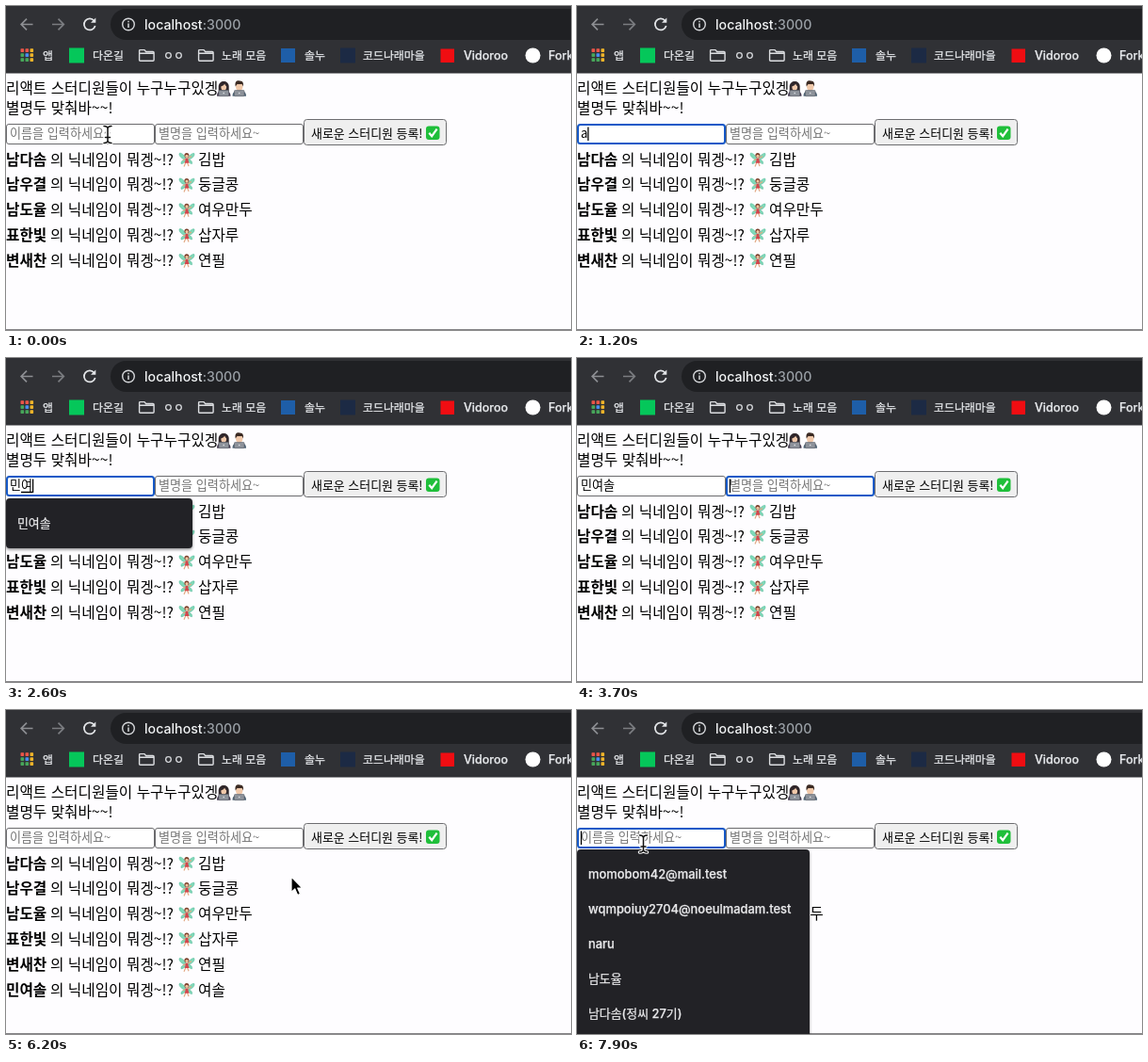
Write an HTML page that moves like this. It is 600x344 px and loops after 8 s.

```html
<!DOCTYPE html>
<html lang="ko">
<head>
<meta charset="utf-8">
<title>스터디원 목록</title>
<style>
html, body { margin: 0; width: 100%; height: 100%; overflow: hidden; background: #fefdff; }
svg { display: block; width: 100vw; height: 100vh; }
text { font-family: "Noto Sans CJK KR", "Noto Sans CJK", "Noto Sans CJK JP", sans-serif; white-space: pre; }
.ui { font-family: Inter, "Noto Sans CJK KR", "Noto Sans CJK", "Noto Sans CJK JP", sans-serif; font-weight: 500; }
.mark { font-size: 11.9px; fill: #e8eaed; stroke: #e8eaed; stroke-width: .25px; }
.page { font-size: 15.7px; fill: #000; }
.field { font-size: 13.1px; }
.menu { font-size: 12.9px; fill: #e9e9eb; stroke: #e9e9eb; stroke-width: .25px; }
</style>
</head>
<body>
<svg viewBox="0 0 600 344" preserveAspectRatio="none">
  <defs>
    <g id="fairy">
      <path d="M8 8.500C6 4 2 1 .5 2.500 0 5 3 8 6.500 9 3.500 9.500 2 11.500 2.500 13.500c3 0 4.500-2.500 5.500-5zM9 8.500c2-4.500 6-7 7.500-6 .5 3-2.500 5.500-6 6.500 3 .5 4 2.500 3.500 4.500-2.500 0-4-2.500-5-5z" fill="#7fd9b8" stroke="#4fb596" stroke-width=".5"/>
      <path d="M7.500 12l-2 4.500M9 12l1.500 4M7.500 8l-3 2M9.500 8l4-2.500" stroke="#e2a883" stroke-width="1.200" fill="none"/>
      <path d="M7.200 7.500h2.500l.4 2.500 1 2.700H6l1-2.700z" fill="#d2464c"/>
      <circle cx="8.400" cy="4.500" r="2.500" fill="#7a3f2a"/>
      <circle cx="8.500" cy="5.200" r="1.600" fill="#f2c6a2"/>
    </g>
    <g id="laptop">
      <rect x="3" y="10.500" width="10.500" height="6.200" rx=".8" fill="#8d929a" stroke="#5f646c" stroke-width=".6"/>
      <circle cx="8.200" cy="13.500" r=".8" fill="#e3e5e8"/>
    </g>
    <g id="woman">
      <path d="M2.700 13V6.500c0-7.500 11-7.500 11 0V13z" fill="#30272b"/>
      <path d="M1 16.700c0-5 3-6 7.200-6s7.300 1 7.300 6z" fill="#453a50"/>
      <ellipse cx="8.200" cy="7" rx="2.900" ry="3.600" fill="#f0c8aa"/>
      <path d="M4.700 6.500c2-.5 4-1.500 4.500-3 .4 1.500 1.500 2.500 2.700 3V3L8 1 5 3z" fill="#30272b"/>
      <use href="#laptop"/>
    </g>
    <g id="man">
      <path d="M1 16.700c0-5 3-6 7.200-6s7.300 1 7.300 6z" fill="#4d6274"/>
      <ellipse cx="8.200" cy="6.500" rx="3.700" ry="4.400" fill="#f0c8aa"/>
      <path d="M4.200 6.500C3 0 7 0 8.500.5c4-.3 4.500 3 3.700 6l-1-2.500H6z" fill="#3b2a23"/>
      <use href="#laptop"/>
    </g>
    <path id="folder" d="M.6 2.500V1.600Q.6.6 1.600.6H6l1.600 1.900h7.500q1 0 1 1v7.800q0 1-1 1H1.600q-1 0-1-1zM.6 4.300h15.500" fill="none" stroke="#dcdee1" stroke-width="1.400"/>
    <path id="bar" d="M-4-9Q0-9 0-6V6Q0 9-4 9M4-9Q0-9 0-6M4 9Q0 9 0 6M-2.500 3H2.500"/>
    <filter id="shade" x="-10%" y="-10%" width="120%" height="130%">
      <feDropShadow dx="0" dy="1.500" stdDeviation="1.800" flood-opacity=".45"/>
    </filter>
  </defs>

  <rect width="600" height="344" fill="#fefdff"/>
  <g id="page"></g>
  <g id="form"></g>
  <rect y="343" width="600" height="1" fill="#858487"/>
  <g id="menus"></g>
  <g id="chrome"></g>

  <g id="beam" fill="none" stroke-linecap="round">
    <use href="#bar" stroke="#fff" stroke-width="3.600"/>
    <use href="#bar" stroke="#111" stroke-width="1.500"/>
  </g>
  <path id="arrow" d="M0 0V16.500L3.800 13 6.600 19.500 9.500 18.300 6.700 12H11.700Z" fill="#000" stroke="#fff" stroke-width="1.200" stroke-linejoin="round"/>
</svg>
<script>
const LOOP = 8000;
const NEW_NAME = '민여솔', NEW_NICK = '여솔';
const $ = id => document.getElementById(id);
const label = (x, y, s, cls, more = '') => `<text x="${x}" y="${y}" class="${cls}" ${more}>${s}</text>`;
const box = (x, y, w, h, r, fill, more = '') =>
  `<rect x="${x}" y="${y}" width="${w}" height="${h}" rx="${r}" fill="${fill}" ${more}/>`;
const put = (id, x, y) => `<use href="#${id}" x="${x}" y="${y}"/>`;
const show = (el, on) => el.setAttribute('visibility', on ? 'visible' : 'hidden');
const setAll = (el, attrs) => Object.entries(attrs).forEach(([k, v]) => el.setAttribute(k, v));

// Browser toolbar and bookmarks
function toolbar() {
  const dots = ['#ea5548', '#ea5548', '#f0b429', '#47a65a', '#4a8df0', '#f0b429', '#47a65a', '#47a65a', '#f0b429'];
  return box(0, 0, 600, 71.5, 0, '#303135') + box(111, 3, 520, 33, 16.5, '#1f2023') +
    `<g fill="none" stroke-width="1.700">
      <path d="M28.500 19.500H16.500M22 13.700l-5.800 5.800 5.800 5.800" stroke="#8d8f93"/>
      <path d="M49 19.500H61M55.500 13.700l5.800 5.800-5.800 5.800" stroke="#7b7d81"/>
      <path d="M93.600 15.700A6 6 0 1 0 94.700 21" stroke="#e3e5e8"/>
      <circle cx="130" cy="19.500" r="6.300" stroke="#d5d7da" stroke-width="1.400"/>
      <path d="M130 18.600V23M130 15.700V17.200" stroke="#d5d7da" stroke-width="1.500"/>
    </g><path d="M95.300 12.500v5.300h-5.300z" fill="#e3e5e8"/>` +
    label(147, 24.7, 'localhost<tspan fill="#9aa0a6">:3000</tspan>', 'ui', 'font-size="14.200" fill="#f1f3f4"') +
    dots.map((c, i) => box(15.5 + i % 3 * 5, 45.3 + (i / 3 | 0) * 5, 3.6, 3.6, .6, c)).join('') +
    box(67, 44.5, 16, 16, 0, '#05c75a') + put('folder', 141, 46) + put('folder', 204, 46) +
    box(292, 45, 15, 15, 0, '#1e5ea8') + box(355, 44.5, 16, 16, 0, '#1c2a44') +
    box(461.5, 45.5, 14.5, 14.5, 0, '#f00d12') + '<circle cx="559.500" cy="52.500" r="8" fill="#fff"/>' +
    [[39, '앱'], [92, '다온길'], [167, 'ㅇㅇ'], [229, '노래 모음'], [317, '솔누'], [379, '코드나래마을']]
      .map(([x, s]) => label(x, 56.7, s, 'mark')).join('') +
    [[486, 'Vidoroo'], [576, 'Forkubo']]
      .map(([x, s]) => label(x, 56.7, s, 'mark ui', 'style="font-size:12.500px"')).join('');
}

function member([name, nick], i) {
  const y = 168.6 + i * 26.8;
  return `<g id="row${i}">` + label(0, y, name, 'page', 'font-weight="700"') +
    label(47, y, '의 닉네임이 뭐겡~!?', 'page') + put('fairy', 183.5, y - 14.5) + label(204, y, nick, 'page') + '</g>';
}

function menu(id, y, w, h, pitch, items) {
  return `<g id="${id}">` + box(0, y, w, h, 4, '#242427', 'filter="url(#shade)"') +
    items.map((s, i) => label(12, y + 31 + i * pitch, s, 'menu ui')).join('') + '</g>';
}

$('chrome').innerHTML = toolbar();
$('page').innerHTML =
  label(0, 92.5, '리액트 스터디원들이 누구누구있겡', 'page') + put('woman', 223, 79) + put('man', 239.5, 79) +
  label(0, 114, '별명두 맞춰바~~!', 'page') +
  [['남다솜', '김밥'], ['남우결', '둥글콩'], ['남도율', '여우만두'], ['표한빛', '삽자루'], ['변새찬', '연필'], [NEW_NAME, NEW_NICK]]
    .map(member).join('');
$('form').innerHTML = [0, 158].map((x, i) =>
  `<g id="field${i}">` + box(x, 125, 157, 21, 2.5, '#fff') + label(x + 4, 139.8, '', 'field') +
  '<path fill="none" stroke="#000" stroke-width="1.300"/></g>').join('') +
  box(316.5, 120.5, 151, 27, 3, '#efefef', 'id="button" stroke="#6d6d70"') +
  label(324, 139.5, '새로운 스터디원 등록!', '', 'font-size="12.950"') +
  box(446, 127.5, 14.5, 14.5, 3, '#1fbf3a') +
  '<path d="M449.300 134.800l2.900 3.400 5.400-7.500" fill="none" stroke="#fff" stroke-width="2.200"/>';
$('menus').innerHTML = menu('hint', 149, 198, 53, 37, [NEW_NAME]) +
  menu('history', 148, 247, 210, 37.1,
    ['momobom42@mail.test', 'wqmpoiuy2704@noeulmadam.test', 'naru', '남도율', '남다솜(정씨 27기)']);

// Typing: [time, value]
const typed = [
  [[0, ''], [1100, 'a'], [1500, ''], [1800, 'ㅁ'], [2000, '미'], [2200, '민'], [2400, '민ㅇ'], [2550, '민여'],
   [2750, '민엿'], [2900, '민여소'], [3050, NEW_NAME], [5700, '']],
  [[0, ''], [3900, 'ㅇ'], [4000, '여'], [4100, '엿'], [4200, '여소'], [4280, NEW_NICK], [5700, '']]
];
const focus = [[0, -1], [500, 0], [3500, 1], [5600, -1], [7700, 0]];
const menus = [[0, ''], [500, 'history'], [1100, ''], [1500, 'history'], [1800, ''], [2200, 'hint'], [3300, ''], [7700, 'history']];
const route = [[0, 108, 136.5], [4700, 181.5, 74], [4800, 181.5, 74], [5400, 385, 136], [5700, 385, 136],
  [6200, 303, 177], [7300, 303, 177], [7700, 70.5, 142], [LOOP, 70.5, 142]];
const hints = ['이름을 입력하세요~', '별명을 입력하세요~'];
const last = (keys, t) => keys.filter(k => k[0] <= t).pop();

function drawField(i, t) {
  const [rect, text, line] = $('field' + i).children;
  const [since, value] = last(typed[i], t);
  const [focused, which] = last(focus, t);
  const active = which === i, left = i * 158, x = left + 4;
  setAll(rect, active
    ? { x: left + 1, y: 126, width: 156, height: 20, stroke: '#1659c7', 'stroke-width': 2 }
    : { x: left + .5, y: 125.5, width: 157, height: 21, stroke: '#6a6a6d', 'stroke-width': 1 });
  text.textContent = value || hints[i];
  text.setAttribute('fill', value ? '#000' : '#757575');

  const width = value ? text.getComputedTextLength() : 0;
  const composing = active && /[ㄱ-힣]$/.test(value);
  const blink = (t - Math.max(since, focused)) % 1000 < 500;
  let d = '';
  if (active && blink) d += `M${x + width + .5} 128.500V143`;
  if (composing) {
    const start = value.length > 1 ? text.getSubStringLength(0, value.length - 1) : 0;
    d += `M${x + start} 142.500H${x + width}`;
  }
  line.setAttribute('d', d);
}

function drawPointer(t) {
  const k = Math.max(0, route.findIndex(p => p[0] > t) - 1);
  const [t0, x0, y0] = route[k], [t1, x1, y1] = route[k + 1];
  const u = k ? (t - t0) / (t1 - t0) : 0, e = u * u * (3 - 2 * u);
  const x = x0 + (x1 - x0) * e, y = y0 + (y1 - y0) * e;
  const visible = t < 1100 || t >= 4700;
  const overField = x < 315 && y > 125 && y < 147;
  const beam = t < 4900 || overField;
  show($('beam'), visible && beam);
  show($('arrow'), visible && !beam);
  for (const id of ['beam', 'arrow']) $(id).setAttribute('transform', `translate(${x} ${y})`);
}

function draw(t) {
  drawField(0, t);
  drawField(1, t);
  drawPointer(t);
  const open = last(menus, t)[1];
  show($('hint'), open === 'hint');
  show($('history'), open === 'history');
  show($('row5'), t >= 5700);
  $('button').setAttribute('fill', t >= 5600 && t < 5700 ? '#f5f5f5' : '#efefef');
}

const begin = performance.now();
function tick() {
  draw((performance.now() - begin) % LOOP);
  requestAnimationFrame(tick);
}
tick();
</script>
</body>
</html>
```
